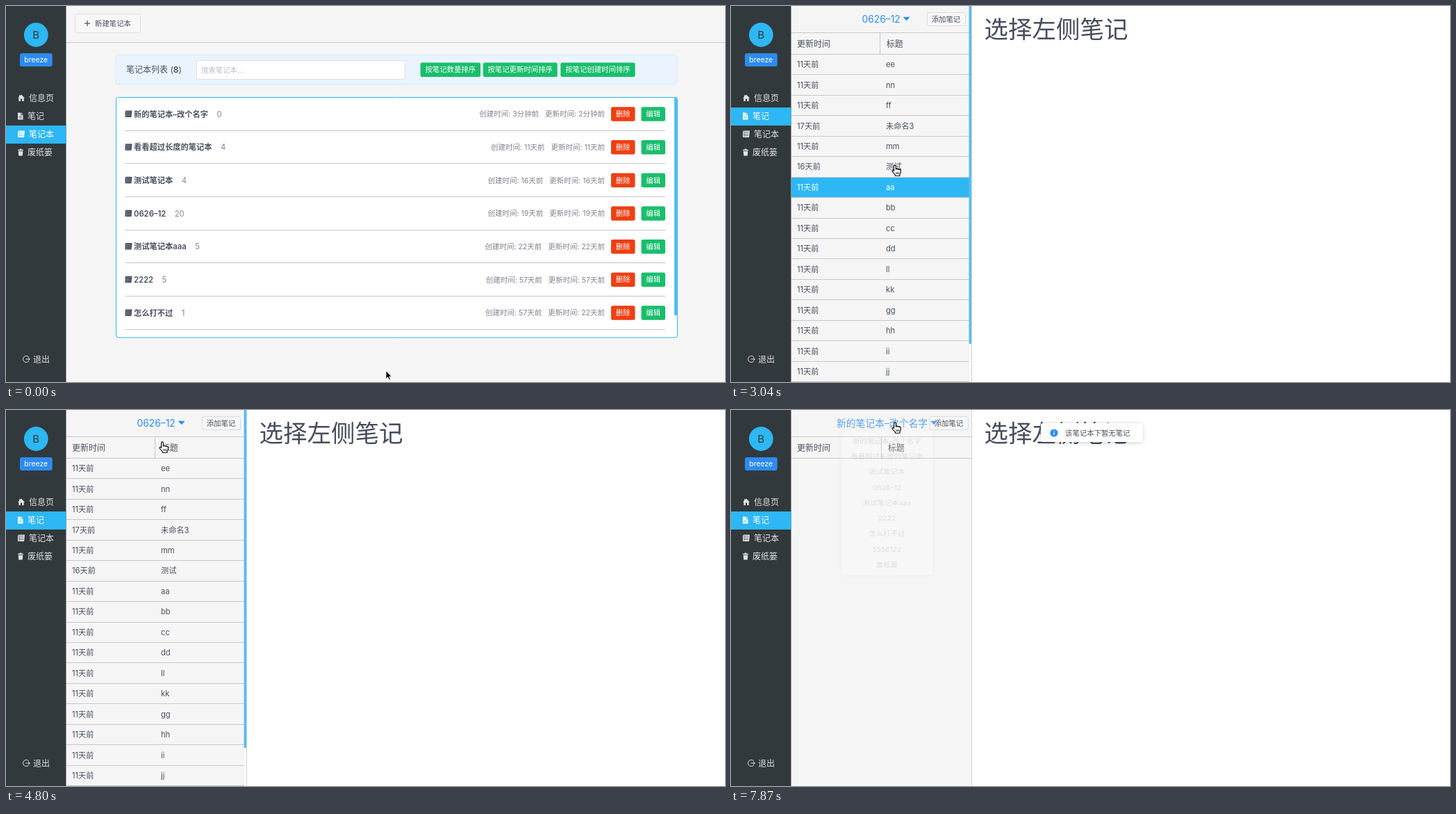
An HTML page with a canvas that plays this animation: 1035x541 px, repeating every 8000 ms.

```html
<!DOCTYPE html>
<html lang="zh">
<head>
<meta charset="utf-8">
<title>笔记本</title>
<style>
html, body { margin: 0; width: 100%; height: 100%; overflow: hidden; background: #f5f5f5; }
canvas { display: block; width: 1035px; height: 541px; }
</style>
</head>
<body>
<canvas id="stage"></canvas>
<script>
const W = 1035, H = 541, LOOP = 8000;
const canvas = document.getElementById('stage');
const ctx = canvas.getContext('2d');
const dpr = window.devicePixelRatio || 1;
canvas.width = W * dpr;
canvas.height = H * dpr;

const FONT = 'Inter, "Noto Sans CJK SC", "Noto Sans CJK", sans-serif';
const SKY = '#2db7f5', BLUE = '#2d8cf0', PALE = '#57a3f3', GREEN = '#19be6b', RED = '#ed3f14';
const INK = '#495060', GREY = '#80848f', LINE = '#c6c7ca', PAPER = '#f5f5f5', DARK = '#32393c';
const SIDE = 86.5, ROW = 29.45;

// name, note count, created, updated
const books = [
  ['新的笔记本–改个名字', 0, '3分钟前', '2分钟前'],
  ['看看超过长度的笔记本', 4, '11天前', '11天前'],
  ['测试笔记本', 4, '16天前', '16天前'],
  ['0626–12', 20, '19天前', '19天前'],
  ['测试笔记本aaa', 5, '22天前', '22天前'],
  ['2222', 5, '57天前', '57天前'],
  ['怎么打不过', 1, '57天前', '22天前'],
  ['5558122', 1, '65天前', '14天前']
];
const notes = 'ee nn ff 未命名3 mm 测试 aa bb cc dd ll kk gg hh ii jj 未命名2 未命名1 未命名212 未命名'.split(' ');
const noteAge = name => name === '测试' ? '16天前' : name.startsWith('未命名') ? '17天前' : '11天前';

// The picture holds between steps: first time, last time, count
const bursts = [[150, 1050, 7], [1200, 2110, 7], [2410, 2740, 3], [3040, 3770, 6],
  [4060, 5090, 8], [5240, 6270, 8], [6410, 6560, 2], [6850, 7870, 8]];
const steps = [0];
for (const [a, b, n] of bursts)
  for (let i = 0; i < n; i++) steps.push(Math.floor((a + (b - a) * i / (n - 1)) / 10) * 10);

const cursorPath = [[0, 547, 525], [150, 528, 503], [600, 325, 325], [900, 230, 235], [1050, 222, 247],
  [1500, 222, 258], [1950, 221, 269], [2900, 221, 269], [3040, 236, 229], [3480, 235, 241], [4060, 235, 241],
  [4200, 232, 235], [4220, 232, 235], [4350, 216, 119], [4640, 222, 62], [4940, 228, 30], [5240, 232, 20],
  [5680, 232, 20], [5970, 205, 40], [6270, 180, 47], [6560, 240, 44], [6850, 240, 44], [7290, 240, 42],
  [7730, 236, 18], [8000, 236, 18]];
const bookScroll = [[1050, 0], [1350, 14], [1800, 35.6]];
const noteScroll = [[3040, 0], [3180, 18], [3480, 93], [3770, 93], [4060, 42], [4200, 0]];

const clamp = v => Math.max(0, Math.min(1, v));
const out = p => 1 - (1 - p) ** 2;

function along(path, t) {
  let i = 0;
  while (i < path.length - 2 && t >= path[i + 1][0]) i++;
  const a = path[i], b = path[i + 1], p = clamp((t - a[0]) / (b[0] - a[0]));
  return a.slice(1).map((v, k) => v + (b[k + 1] - v) * p);
}

function rect(x, y, w, h, fill) {
  ctx.fillStyle = fill;
  ctx.fillRect(x, y, w, h);
}

function box(x, y, w, h, r, fill, stroke) {
  ctx.beginPath();
  ctx.roundRect(x, y, w, h, r);
  if (fill) { ctx.fillStyle = fill; ctx.fill(); }
  if (stroke) { ctx.strokeStyle = stroke; ctx.lineWidth = 1; ctx.stroke(); }
}

function disc(x, y, r, fill) {
  ctx.beginPath();
  ctx.arc(x, y, r, 0, 7);
  ctx.fillStyle = fill;
  ctx.fill();
}

// Draws text centred on cy and returns its width
function text(s, x, cy, size, fill, align = 'left', weight = 400) {
  ctx.font = `${weight} ${size}px ${FONT}`;
  ctx.textAlign = align;
  ctx.fillStyle = fill;
  ctx.fillText(s, x, cy + size * 0.375);
  return ctx.measureText(s).width;
}

function shape(d, x, y, fill, stroke, width = 1) {
  const path = new Path2D(d);
  ctx.save();
  ctx.translate(x, y);
  if (fill) { ctx.fillStyle = fill; ctx.fill(path); }
  if (stroke) { ctx.strokeStyle = stroke; ctx.lineWidth = width; ctx.lineJoin = 'round'; ctx.stroke(path); }
  ctx.restore();
}

// White card; its shadow is kept outside so the card can fade cleanly
function raised(x, y, w, h) {
  ctx.save();
  ctx.beginPath();
  ctx.rect(x - 20, y - 20, w + 40, h + 40);
  ctx.roundRect(x, y, w, h, 3);
  ctx.clip('evenodd');
  ctx.shadowColor = 'rgba(0,0,0,.2)';
  ctx.shadowBlur = 6 * dpr;
  ctx.shadowOffsetY = dpr;
  box(x, y, w, h, 3, '#fff');
  ctx.restore();
  box(x, y, w, h, 3, '#fff');
}

function button(label, x, y, w, fill) {
  box(x, y, w, 20.5, 2.5, fill);
  text(label, x + w / 2, y + 10, 10.4, '#fff', 'center');
}

function bookIcon(x, y, fill, gap) {
  shape('M1 0H10L9 9.5H0V1.5Z', x, y, fill);
  for (const dy of [2, 4.4, 6.8]) rect(x + 2.2, y + dy, 6, 0.6, gap);
  rect(x + 1.6, y + 1, 0.6, 8, gap);
}

function sidebar(active) {
  rect(0, 0, SIDE, H, DARK);
  disc(43.3, 41.5, 17.4, SKY);
  text('B', 43.2, 41.5, 15, DARK, 'center');
  box(20, 68, 46.7, 19, 3, BLUE);
  text('breeze', 43.2, 77, 10.4, '#fff', 'center');
  rect(0, 146 + (active - 1) * 26, SIDE, 26, SKY);
  const tint = i => i === active ? '#fff' : '#dfe3e5';
  ['信息页', '笔记', '笔记本', '废纸篓'].forEach((s, i) =>
    text(s, i % 2 ? 31 : 33, 132.5 + i * 26, 12, tint(i)));
  shape('M5 0L10 5H8.7V9.5H6V6H4V9.5H1.3V5H0L2 3V.8H3.4V1.6Z', 17, 127.5, tint(0));
  shape('M0 0H4.4V3.4H7.5V10H0ZM5.2 0L7.5 2.6H5.2Z', 17, 153.5, tint(1));
  rect(18.5, 158.6, 4.4, 0.7, active === 1 ? SKY : DARK);
  rect(18.5, 160.6, 4.4, 0.7, active === 1 ? SKY : DARK);
  bookIcon(17, 179.5, tint(2), active === 2 ? SKY : DARK);
  shape('M0 1.2H2.6V0H5.4V1.2H8V2.4H0ZM.7 3.2H7.3L6.8 10H1.2Z', 17, 205.5, tint(3));
  shape('M9 2.2A4.6 4.6 0 1 0 9 7.3M4.5 4.8H10.3M8.3 2.8L10.3 4.8L8.3 6.8', 24, 503.3, null, '#dfe3e5', 1);
  text('退出', 39, 508, 12, '#dfe3e5');
}

function bookPage(scroll, mx, my) {
  rect(86, 0, W - 86, H, PAPER);
  rect(86, 52, W - 86, 1, LINE);
  box(99.5, 11.5, 94, 27, 3, '#f7f7f7', '#d9dce0');
  rect(113, 24.4, 8, 1.2, INK);
  rect(116.4, 21, 1.2, 8, INK);
  text('新建笔记本', 128, 25, 10.4, INK);

  box(158, 70.5, 808, 42.5, 4, '#eaf4fe', '#d5e8fc');
  let x = 173 + text('笔记本列表 (', 173, 91.3, 12, INK);
  x += text('8', x, 91.3, 12, INK, 'left', 600);
  text(')', x, 91.3, 12, INK);
  box(274.5, 78.5, 300, 27, 3, '#fff', '#dddee1');
  text('搜索笔记本...', 281, 92, 10.4, '#bbbec4');
  button('按笔记数量排序', 596.5, 81.5, 86.5, GREEN);
  button('按笔记更新时间排序', 686.7, 81.5, 107, GREEN);
  button('按笔记创建时间排序', 798.3, 81.5, 107.3, GREEN);

  box(158.5, 131.5, 808, 345.5, 3, '#fff');
  ctx.save();
  ctx.beginPath();
  ctx.rect(159, 132, 807, 345);
  ctx.clip();
  books.forEach(([name, count, made, changed], i) => {
    const y = 155.5 + i * 47.65 - scroll;
    ctx.font = `600 11.25px ${FONT}`;
    const end = 184 + ctx.measureText(name).width;
    const over = mx > 171 && mx < end && Math.abs(my - y) < 10;
    bookIcon(171.5, y - 5, over ? '#1c7cd6' : INK, over ? '#8fc0ee' : '#9499a3');
    text(name, 184, y, 11.25, over ? '#1c7cd6' : INK, 'left', 600);
    text(count, end + 12.5, y, 11.25, GREY);
    const w = text('更新时间: ' + changed, 862, y, 10.5, GREY, 'right');
    text('创建时间: ' + made, 862 - w - 9, y, 10.5, GREY, 'right');
    button('删除', 871, y - 10.2, 34.5, RED);
    button('编辑', 914.5, y - 10.2, 34.5, GREEN);
    rect(171.5, Math.round(y + 23.3), 777.5, 1, LINE);
  });
  rect(962, 132 + scroll * 0.905, 4, 313, '#57bdf2');
  ctx.restore();
  box(158.5, 131.5, 808, 345.5, 3, null, SKY);
}

function menu(p, cx, my) {
  if (p <= 0) return;
  ctx.save();
  ctx.globalAlpha = p;
  ctx.translate(0, 29.5);
  ctx.scale(1, 0.8 + 0.2 * p);
  raised(cx - 66, 0, 132, 249.5);
  [...books.map(b => b[0]), '废纸篓'].forEach((s, i) => {
    const y = 18 + i * 26.75;
    if (my > 30 && Math.abs(my - 29.5 - y) < 13.3) rect(cx - 66, y - 13.3, 132, 26.7, '#f3f3f3');
    text(s, cx, y, 10.4, INK, 'center');
  });
  ctx.restore();
}

function noteRows(t) {
  // Row hover trails the pointer by one step
  const past = t - 140;
  const my = along(cursorPath, past)[1] + along(noteScroll, past)[0];
  const lit = t < 2740 || t >= 5240 ? -1 : Math.floor((my - 69.2) / ROW);
  const edge = i => Math.round(98.4 + i * ROW);
  notes.forEach((name, i) => {
    const y = 84 + i * ROW, top = edge(i - 1) + 1, bottom = edge(i);
    const ink = i === lit ? '#fff' : INK;
    if (i === lit) rect(87, top, 256, bottom - top, SKY);
    rect(87, bottom, 256, 1, LINE);
    text(noteAge(name), 95, y, 11.2, ink);
    text(name, 223, y, 11.2, ink);
  });
}

function notePage(t, scroll, my) {
  const empty = t >= 6990;
  const filled = t >= 2570 && !empty;
  const dx = empty ? 2 : 0;
  const wide = empty ? 260 : 257;
  rect(86, 0, 261, H, empty ? PAPER : '#fafafa');
  rect(347, 0, W - 347, H, '#fff');
  text('选择左侧笔记', 364.5, 33, 34.5, '#464c5b');

  ctx.save();
  ctx.beginPath();
  ctx.rect(86, 0, 261, H);
  ctx.clip();
  ctx.translate(0, -scroll);
  rect(86, 0, wide, 700, PAPER);
  rect(86, 38, wide, 1, LINE);
  rect(86, 69, wide, 1, LINE);
  rect(214 + dx, 39, 1, 30, LINE);
  text('更新时间', 95, 54, 12, INK);
  text('标题', 223.7 + dx, 54, 12, INK);
  if (filled) noteRows(t);
  box(282.5 + dx * 2, 9.5, 55, 19, 2.5, '#f7f7f7', '#d9dce0');
  text('添加笔记', 288.7 + dx * 2, 19, 10.4, INK);
  const tone = my < 29 ? PALE : BLUE;
  const left = empty ? 152 : 188.5;
  const end = left + text(empty ? books[0][0] : books[3][0], left, 18.7, 13.8, tone);
  shape('M0 0H10L5 5.4Z', end + 4, 15.8, tone);
  ctx.restore();

  if (filled) rect(342.5, Math.round(scroll * 0.84), 3.5, 486, '#57bdf2');
  rect(346, 0, 1, H, '#d3d5d8');

  if (t < 6850) menu(out(clamp((t - 5212) / 300)), 222.5, my);
  else if (t < 7500) menu(1 - clamp((t - 6800) / 280), 222.5 + dx, my);
  else menu(clamp((t - 7825) / 280), 224.5, 0);

  const shown = out(clamp((t - 7050) / 240));
  if (shown > 0) {
    ctx.save();
    ctx.globalAlpha = shown;
    ctx.translate(0, -27 * (1 - shown));
    raised(446, 19, 146.5, 27);
    disc(465, 33, 5.6, BLUE);
    rect(464.4, 32, 1.3, 3.8, '#fff');
    rect(464.4, 29.8, 1.3, 1.3, '#fff');
    text('该笔记本下暂无笔记', 481, 33, 10.4, INK);
    ctx.restore();
  }
}

function pointer(t, x, y) {
  if (t < 900) {
    shape('M0 0V11.5L2.7 9L4.5 13L6.4 12.2L4.7 8.3H8.2Z', x, y, '#000', '#fff', 0.8);
    return;
  }
  shape('M-1.4 8.5V1.3a1.4 1.4 0 0 1 2.8 0V6a1.3 1.3 0 0 1 2.5.2a1.3 1.3 0 0 1 2.4.6a1.1 1.1 0 0 1 2 .7V11L7 13V15.3H.4V14L-3.7 9.4a1.3 1.3 0 0 1 1.9-1.8z',
    x, y, '#fff', '#000', 1.1);
  shape('M1.8 10V13M3.7 10V13M5.6 10V13', x, y, null, '#000', 0.8);
}

function draw(t) {
  ctx.setTransform(dpr, 0, 0, dpr, 0, 0);
  const [x, y] = along(cursorPath, t);
  const onBooks = t < 2410;
  if (onBooks) bookPage(along(bookScroll, t)[0], x, y);
  else notePage(t, along(noteScroll, t)[0], y);
  sidebar(onBooks ? 2 : 1);
  pointer(t, x, y);
}

function tick() {
  const t = performance.now() % LOOP;
  draw(steps.findLast(s => s <= t));
  requestAnimationFrame(tick);
}
tick();
</script>
</body>
</html>
```
